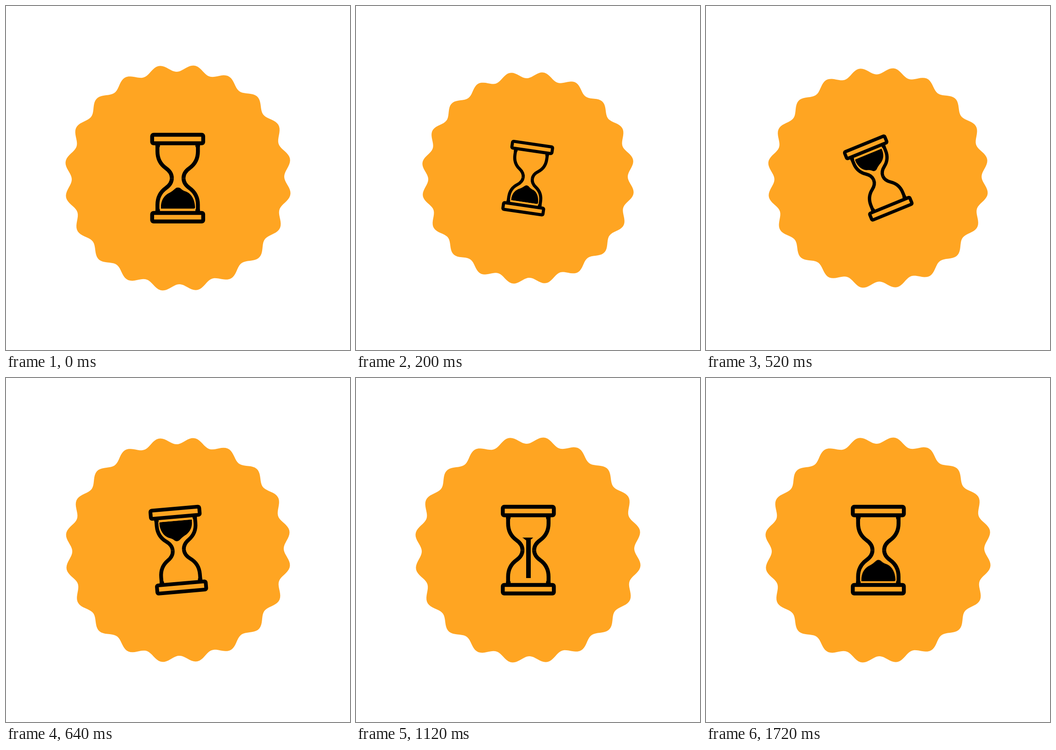
Recreate the animation shown at these times as an HTML page. Size 748x748 px, loop 2 s.

```html
<!DOCTYPE html>
<html lang="en">
<head>
<meta charset="utf-8">
<title>Hourglass</title>
<style>
  html, body { margin: 0; width: 100%; height: 100%; overflow: hidden; background: #fff; }
  svg { display: block; width: 100%; height: 100%; }

  .badge, .spin, .glass, .sand, .stream, .pile {
    --ease: cubic-bezier(.333, 0, .667, 1);
    animation: 2000ms var(--ease) calc(var(--time, 0) * -1ms) infinite paused;
  }
  .badge  { animation-name: breathe; fill: #ffa522; }
  .spin   { animation-name: flip; }
  .glass  { animation-name: shrink; }
  .sand   { animation-name: drain; }
  .stream { animation-name: pour; }
  .pile   { animation-name: heap; }
  .frame  { fill: none; stroke: #000; stroke-width: 8.5; }
  .joint  { stroke-width: 10; stroke-linecap: round; }

  @keyframes breathe {
    0%, 36%, 100% { scale: 1; }
    12% { scale: .934; }
  }
  @keyframes shrink {
    0%, 37%, 100% { scale: 1; }
    15.5% { scale: .709; }
  }
  @keyframes flip {
    0%, 3.2% { rotate: 0deg; animation-timing-function: cubic-bezier(.6, 0, .23, 1); }
    39.1%, 100% { rotate: 180deg; }
  }
  @keyframes drain {
    0%, 38% { clip-path: inset(0 0 0 0); }
    62%, 100% { clip-path: inset(0 0 100% 0); }
  }
  @keyframes pour {
    0%, 40% { clip-path: inset(0 0 100% 0); }
    56%, 62% { clip-path: inset(0 0 0 0); }
    80%, 100% { clip-path: inset(100% 0 0 0); }
  }
  @keyframes heap {
    0%, 56% { transform: scale(.3, 0); }
    86%, 100% { transform: scale(1, 1); }
  }
</style>
</head>
<body>
<svg viewBox="0 0 748 748">
  <defs>
    <!-- Heap of sand, its base centred on the origin -->
    <path id="heap" d="M-36.5 -.5C-37 -16.5 -31 -26.5 -21 -33C-12 -37.5 -9 -40.5 -5 -44
      Q0 -48.5 6 -44.5C10 -40.5 13 -39 20 -36.5C31 -31.5 37 -18.5 37.7 -4.5Q38 0 35 0H-35Q-36.5 0 -36.5 -.5Z"/>
    <path id="wall" d="M-44 -72V-58C-44 -40 -36 -29 -25.5 -21.5C-17 -15.5 -12.7 -9 -12.7 0"/>
    <g id="half">
      <rect x="-55.5" y="-94.2" width="111" height="18.5" rx="3"/>
      <use href="#wall"/>
      <use href="#wall" transform="scale(-1 1)"/>
      <path class="joint" d="M-43.5 -72v2M43.5 -72v2"/>
    </g>
  </defs>

  <g transform="translate(374 374)"><path class="badge"/></g>

  <g transform="translate(374 374.3)">
    <g class="spin">
      <g class="glass">
        <g transform="translate(-.7 0)">
          <g class="frame">
            <use href="#half"/>
            <use href="#half" transform="scale(1 -1)"/>
          </g>
          <g class="sand"><use href="#heap" y="66.5"/></g>
        </g>
      </g>
    </g>
  </g>

  <rect class="stream" x="370" y="347.5" width="10" height="87.5"/>
  <g transform="translate(374.3 441.9)"><use class="pile" href="#heap"/></g>
</svg>
<script>
  const LOOP = 2000, STEP = 40;

  // Scalloped edge: a circle with a sine wave of 20 lobes.
  function scallop(radius, depth, lobes, turn) {
    const points = [];
    for (let deg = 0; deg < 360; deg++) {
      const a = deg * Math.PI / 180;
      const r = radius + depth * Math.cos(lobes * (a - turn * Math.PI / 180));
      points.push((r * Math.sin(a)).toFixed(2) + ' ' + (-r * Math.cos(a)).toFixed(2));
    }
    return 'M' + points.join('L') + 'Z';
  }
  document.querySelector('.badge').setAttribute('d', scallop(239, 8, 20, 8.3));

  // The keyframes advance in 40 ms steps.
  const start = performance.now();
  function tick() {
    const time = (performance.now() - start) % LOOP;
    document.documentElement.style.setProperty('--time', Math.floor(time / STEP) * STEP);
    requestAnimationFrame(tick);
  }
  tick();
</script>
</body>
</html>
```
